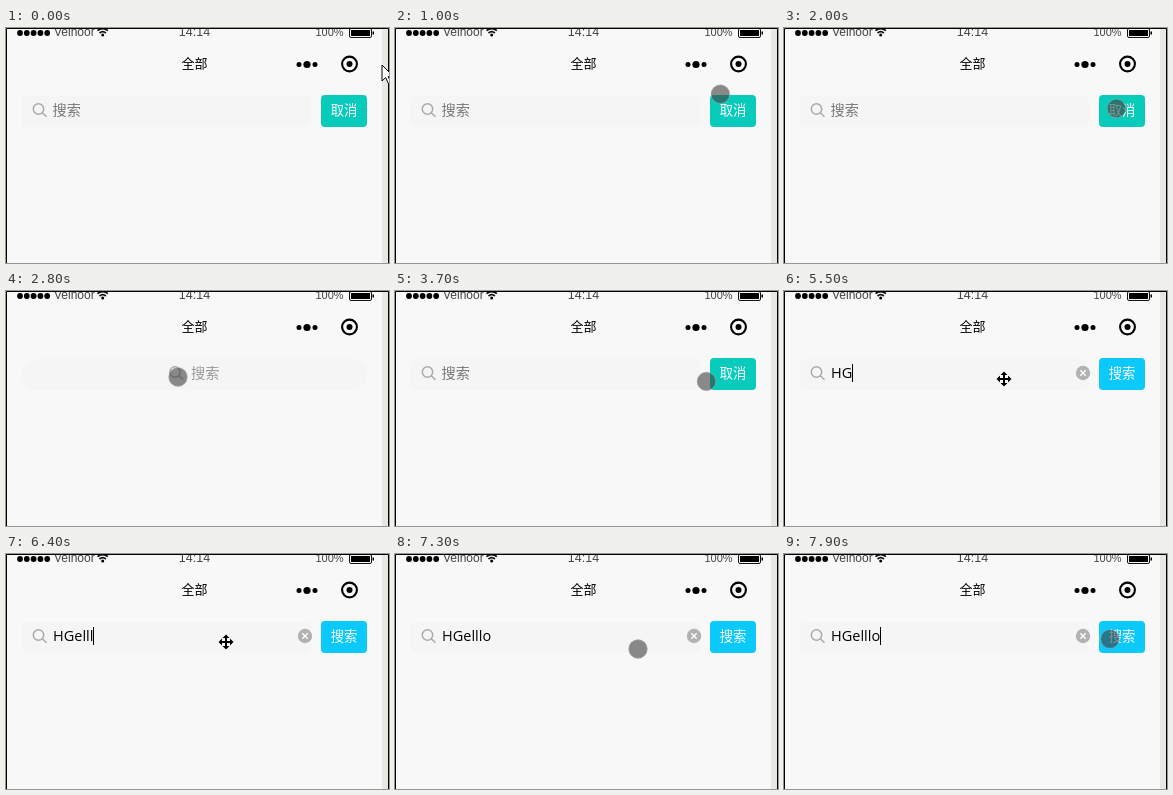
Write an HTML page that moves like this. It is 383 px wide and 235 px high and loops after 8000 ms.

```html
<!DOCTYPE html>
<html lang="zh-CN">
<head>
<meta charset="utf-8">
<style>
html, body { margin: 0; width: 100%; height: 100%; overflow: hidden; background: #f8f8f8 }
svg { display: block }
text { font-family: "Liberation Sans", "Noto Sans CJK SC", "Noto Sans CJK", sans-serif }
.cjk { font-family: "Noto Sans CJK SC", "Noto Sans CJK", sans-serif }
#typed { font-family: "Open Sans", "Noto Sans", sans-serif }
</style>
</head>
<body>
<svg width="383" height="235" viewBox="0 0 383 235">
  <rect width="383" height="235" fill="#f8f8f8"/>
  <rect x="376" width="6" height="235" fill="#e7e7e4"/>

  <path d="M14 5h28" stroke="#000" stroke-width="5.800" stroke-linecap="round" stroke-dasharray="0 6.800"/>
  <g fill="#444">
    <text x="48" y="8" font-size="12">Velnoor</text>
    <text x="188.5" y="8" font-size="12.500" text-anchor="middle">14:14</text>
    <text x="309.500" y="8" font-size="11">100%</text>
  </g>
  <g fill="none" stroke="#111" stroke-width="1.700">
    <path d="M91.500 2.600q5.200-4.200 10.400 0M93.500 5q3.200-2.600 6.400 0"/>
    <rect x="343.500" y=".5" width="22" height="9" rx="1.500" stroke-width="1"/>
  </g>
  <circle cx="96.700" cy="7" r="1.500"/>
  <path d="M345 2h19v6h-19zM366.500 3.500h1.500v3h-1.500z"/>

  <text class="cjk" x="188.500" y="39.500" font-size="13" text-anchor="middle">全部</text>
  <circle cx="293" cy="36.500" r="2.500"/>
  <circle cx="301" cy="36.500" r="3.600"/>
  <circle cx="309" cy="36.500" r="2.500"/>
  <circle cx="343.500" cy="36" r="7.400" fill="none" stroke="#000" stroke-width="2.100"/>
  <circle cx="343.500" cy="36" r="3"/>

  <rect id="bar" x="16" y="68" height="31" fill="#f5f5f5"/>
  <g id="lens" fill="none" stroke="#aaa" stroke-width="1.500">
    <circle cx="32.500" cy="81" r="5.200"/>
    <path d="M36.300 84.700l4.200 4"/>
  </g>
  <text class="cjk" id="hint" y="87" font-size="14.200">搜索</text>
  <text id="typed" x="47" y="87" font-size="14.500"></text>
  <rect id="caret" y="73" width="1" height="18"/>
  <g id="clear">
    <circle cx="299" cy="82" r="7.200" fill="#b2b2b2"/>
    <path d="M296.300 79.300l5.400 5.400m0-5.400l-5.400 5.400" stroke="#fff" stroke-width="1.300"/>
  </g>
  <g id="button">
    <rect id="face" x="315" y="67" width="46" height="32" rx="4"/>
    <text class="cjk" id="label" x="338" y="87" font-size="13.300" font-weight="500" text-anchor="middle" fill="#fff"></text>
  </g>

  <path d="M.5 235V.5h382V235" fill="none" stroke="#000"/>

  <path id="arrow" d="M0 0v16l3.700-3.500 2.600 6 2.500-1.100-2.600-5.900h5.300z" fill="#fff" stroke="#000"/>
  <circle id="touch" r="9.400" fill="#3c3c3c" fill-opacity=".59" stroke="#bbb" stroke-opacity=".45"/>
  <path id="move" d="M0-7.500l3.500 3.500H1v3h3v-2.500L7.500 0 4 3.500V1H1v3h2.500L0 7.500-3.500 4H-1V1h-3v2.500L-7.500 0-4-3.500V-1h3v-3h-2.500z" stroke="#fff" stroke-width="1.200" paint-order="stroke"/>
</svg>
<script>
const $ = id => document.getElementById(id);
const show = (id, on) => $(id).setAttribute('display', on ? 'inline' : 'none');
const set = (id, attrs) => { for (const k in attrs) $(id).setAttribute(k, attrs[k]); };

// All times are in tenths of a second
const home = { x: 376, y: 37 };
const moves = [
  { from: 0, to: 4, x: 198, y: 84 },
  { from: 5, to: 9.2, x: 359, y: 44 },
  { from: 9.2, to: 15, x: 228, y: 85.5, sag: 15 },
  { from: 18, to: 20, x: 332.5, y: 80.5 },
  { from: 23, to: 28, x: 172, y: 86, sag: 24 },
  { from: 34, to: 39, x: 338, y: 83, sag: 13 },
  { from: 40, to: 45, x: 220, y: 88, sag: 9 },
  { from: 72, to: 73, x: 243, y: 95 },
  { from: 73, to: 79, x: 326, y: 85 }
];
const word = 'HGelllo', keys = [55, 55, 57, 60, 62, 64, 66], focus = [30, 47];

// Each move slows toward its end and may sag below the straight line
function pointer(t) {
  let { x, y } = home;
  for (const m of moves) {
    const u = Math.min(Math.max((t - m.from) / (m.to - m.from), 0), 1);
    const k = 1 - (1 - u) ** 2;
    x += (m.x - x) * k;
    y += (m.y - y) * k + (m.sag || 0) * 4 * k * (1 - k);
  }
  return [x, y];
}

function draw(t) {
  const open = t < 23 || (t >= 30 && t < 41) || t >= 47;
  const typed = word.slice(0, keys.filter(k => k <= t).length);

  set('bar', { width: open ? 289 : 345, rx: open ? 5 : 15 });
  set('lens', { transform: `translate(${open ? 0 : 136.5})` });
  set('hint', { x: open ? 46.5 : 185, fill: open ? '#777' : '#999' });
  show('hint', !typed);
  $('typed').textContent = typed;

  // The caret restarts its blink on focus and on every key
  const start = Math.max(...[...focus, ...keys].filter(s => s <= t));
  show('caret', open && (t - start) % 10 < 5);
  set('caret', { x: Math.round(47 + (typed && $('typed').getComputedTextLength())) });

  show('clear', typed);
  show('button', open);
  set('face', { fill: typed ? '#0bc9fa' : '#09cbbb' });
  $('label').textContent = typed ? '搜索' : '取消';

  const shape = t < 1 ? 'arrow' : t >= 52 && t < 73 ? 'move' : 'touch';
  for (const id of ['arrow', 'touch', 'move']) show(id, id === shape);
  set(shape, { transform: `translate(${pointer(t)})` });
}

const begin = performance.now();
function tick() {
  draw(Math.floor((performance.now() - begin) % 8000 / 100));
  requestAnimationFrame(tick);
}
tick();
</script>
</body>
</html>
```
